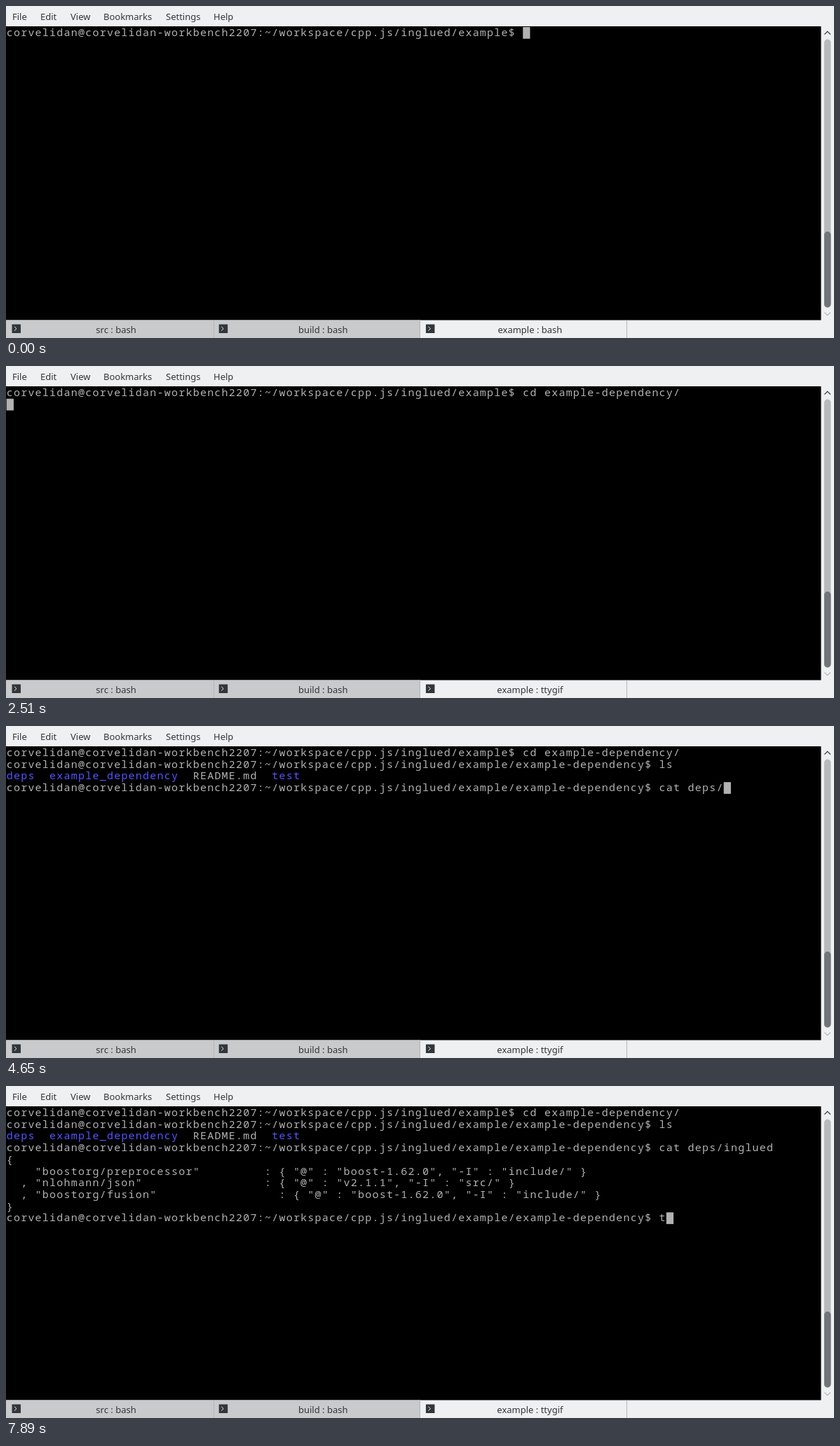
Animation, 1181 px wide and 474 px high, one loop 8000 ms. Source, as an HTML page:

```html
<!DOCTYPE html>
<html lang="en">
<head>
<meta charset="utf-8">
<title>Terminal</title>
<style>
  html, body { margin: 0; width: 100%; height: 100%; overflow: hidden; background: #eff0f1; }
  svg { display: block; width: 1181px; height: 474px; }
  text { font: 13px "Noto Sans", sans-serif; fill: #31363b; white-space: pre; }
  .tab { text-anchor: middle; }
  #screen text { font: 15px "Noto Sans Mono", monospace; letter-spacing: 1.23px; fill: #b2b2b2; }
  #screen .dir { fill: #5454ff; }
</style>
</head>
<body>
<svg viewBox="0 0 1181 474">
  <rect width="1181" height="474" fill="#eff0f1"/>
  <g id="menu"></g>
  <rect y="29" width="1162.5" height="419.5"/>
  <g id="screen"></g>
  <rect id="cursor" width="10.23" height="16.71" fill="#b2b2b2"/>

  <g fill="none" stroke-width="1.1">
    <path d="M1167.5 40.5l4.2-4.2 4.2 4.2" stroke="#31363b"/>
    <path d="M1167.5 437.5l4.2 4.2 4.2-4.2" stroke="#b4b6b8"/>
  </g>
  <rect x="1167" y="47.5" width="9.5" height="383" rx="4.7" fill="#b7b9bb"/>
  <rect x="1167" y="322" width="9.5" height="108.5" rx="4.7" fill="#70757a"/>

  <rect y="448.5" width="591" height="25.5" fill="#c9cacb"/>
  <path d="M296.5 448.5v26M590.5 448.5v26M885.5 448.5v26" stroke="#b3b5b6"/>
  <g id="tabs"></g>
</svg>
<script>
const LOOP = 8000, PITCH = 10.23, ROW = 16.71, LEFT = 0.7, TOP = 30;
const $ = id => document.getElementById(id);

const home = 'corvelidan@corvelidan-workbench2207:~/workspace/cpp.js/inglued/example';
const prompt = home + '/example-dependency$ ';
const dir = name => `<tspan class="dir">${name}</tspan>`;
const listing = `${dir('deps')}  ${dir('example_dependency')}  README.md  ${dir('test')}\n`;
const dependency = (name, column, version, include) =>
  `"${name}"`.padEnd(column) + `: { "@" : "${version}", "-I" : "${include}" }\n`;
const manifest = '{\n'
  + '    ' + dependency('boostorg/preprocessor', 32, 'boost-1.62.0', 'include/')
  + '  , ' + dependency('nlohmann/json', 32, 'v2.1.1', 'src/')
  + '  , ' + dependency('boostorg/fusion', 34, 'boost-1.62.0', 'include/')
  + '}\n';

// Each entry appends its output at the given time (ms).
const session = [
  [0, home + '$ '],
  [500, 'c'], [700, 'd'], [840, ' '], [1800, 'e'], [2020, 'x'], [2190, 'ample-dependency/'],
  [2510, '\n'], [2610, prompt],
  [2770, 'l'], [2870, 's'],
  [3310, '\n'], [3410, listing], [3510, prompt],
  [3900, 'c'], [4030, 'a'], [4200, 't'], [4310, ' '], [4420, 'd'], [4540, 'e'], [4650, 'ps/'],
  [6540, 'i'], [6620, 'n'], [6710, 'glued '],
  [6980, '\n'], [7080, manifest], [7180, prompt],
  [7890, 't'],
];

$('menu').innerHTML = [['File', 9], ['Edit', 49], ['View', 92], ['Bookmarks', 139], ['Settings', 228], ['Help', 296]]
  .map(([label, x]) => `<text x="${x}" y="19.5">${label}</text>`).join('');

$('tabs').innerHTML = ['src : bash', 'build : bash', 'example : bash'].map((label, i) =>
  `<g transform="translate(${i * 295.2} 0)">
    <rect x="8.5" y="454.5" width="12.5" height="12.5" fill="#31363b"/>
    <path d="M12 457.8l3 2.9-3 2.9" fill="none" stroke="#eff0f1"/>
    <text class="tab" x="157" y="466.5">${label}</text>
  </g>`).join('');
const title = $('tabs').lastElementChild.querySelector('text');

const rowTop = row => TOP + row * ROW;
let shown = 0;

function draw(time) {
  const steps = session.filter(([start]) => start <= time);
  if (steps.length === shown) return;
  shown = steps.length;
  const lines = steps.map(step => step[1]).join('').split('\n');
  $('screen').innerHTML = lines.map((line, row) =>
    `<text x="${LEFT}" y="${rowTop(row) + 13}">${line}</text>`).join('');
  const column = $('screen').lastChild.textContent.length;
  $('cursor').setAttribute('x', LEFT + column * PITCH);
  $('cursor').setAttribute('y', rowTop(lines.length - 1));
  title.textContent = time < 2020 ? 'example : bash' : 'example : ttygif';
}

function tick() {
  draw(performance.now() % LOOP);
  requestAnimationFrame(tick);
}
tick();
</script>
</body>
</html>
```
